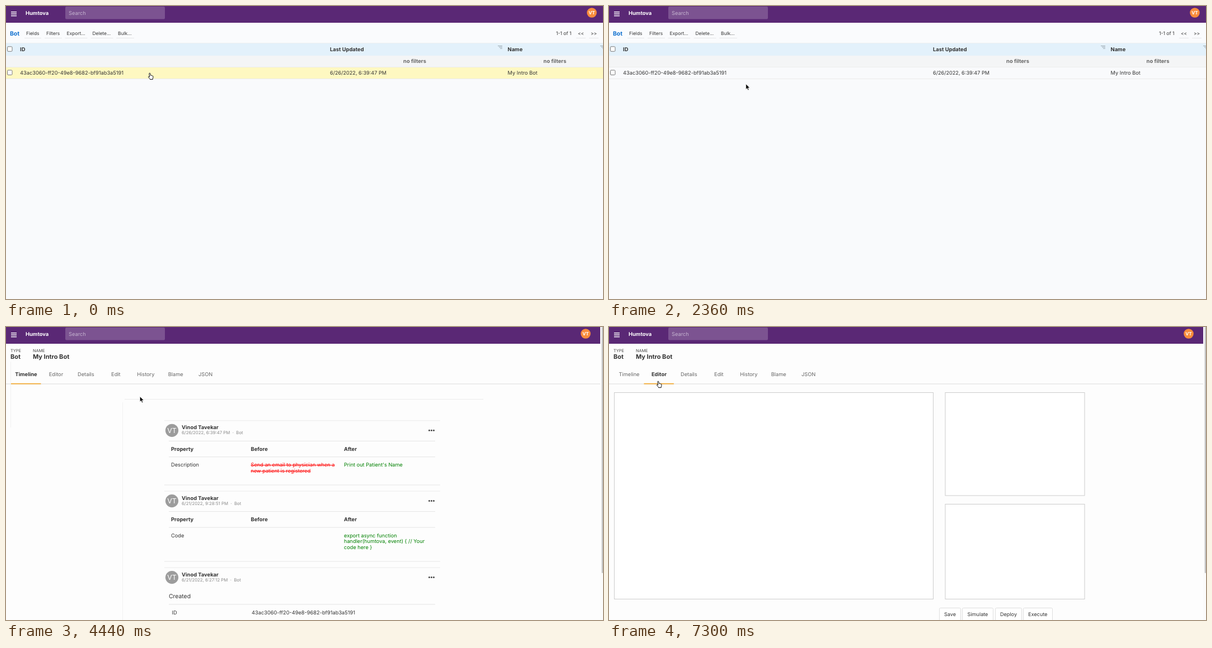
Write an HTML page that moves like this. It is 1067 px wide and 525 px high and loops after 8000 ms.

```html
<!DOCTYPE html>
<html lang="en">
<head>
<meta charset="utf-8">
<title>Bot admin walkthrough</title>
<style>
  html, body { margin: 0; width: 100%; height: 100%; overflow: hidden; background: #f9fafc; }
  svg { display: block; width: 1067px; height: 525px; }
  text { font-family: Inter, "Liberation Sans", sans-serif; text-rendering: geometricPrecision; white-space: pre; }
</style>
</head>
<body>
<svg id="stage" viewBox="0 0 1067 525"></svg>
<script>
const LOOP = 8000;
const LOADING = 3820, LOADED = 4290, NAMED = 4440, EDITOR = 7190;
const BRAND = 'Humtova', PERSON = 'Vinod Tavekar', INITIALS = 'VT', BOT = 'My Intro Bot';
const ID = '43ac3060-ff20-49e8-9682-bf91ab3a5191';

// Markup helpers
const rect = (x, y, w, h, fill, extra = '') =>
  `<rect x="${x}" y="${y}" width="${w}" height="${h}" fill="${fill}" ${extra}/>`;
const frame = (x, y, w, h, stroke = '#ccc', extra = '') => rect(x, y, w, h, '#fff', `stroke="${stroke}" ${extra}`);
const hline = (x1, x2, y, color = '#e4e4e4') => rect(x1, y, x2 - x1, 1, color);
const vline = (x, y1, y2, color) => rect(x, y1, 1, y2 - y1, color);
const text = (x, y, s, size = 9.25, fill = '#333', weight = 400, extra = '') =>
  `<text x="${x}" y="${y}" font-size="${size}" fill="${fill}" font-weight="${weight}" ${extra}>${s}</text>`;
const bold = (x, y, s, size = 9.4, fill = '#333', extra = '') => text(x, y, s, size, fill, 700, extra);
const group = (id, ...parts) => `<g id="${id}">${parts.join('')}</g>`;
const MIDDLE = 'text-anchor="middle"';

const header = () => [
  rect(0, 0, 1067, 30, '#5a2875', 'id="bar"'),
  ...[10, 13.4, 16.8].map(y => rect(9, y, 10, 1.5, '#fff')),
  bold(35, 16, BRAND, 9.4, '#fff'),
  rect(106, 1, 178, 22.5, '#7c5391', 'rx="2"'),
  text(112, 16, 'Search', 9.3, '#c5b3cf'),
  group('avatar',
    '<circle cx="0" cy="12" r="8.8" fill="#f98c3c"/>',
    bold(0, 15, INITIALS, 8.2, '#fff', MIDDLE)),
].join('');

const checkbox = y => frame(2.5, y, 8.5, 8.5, '#767676', 'rx="1.5"');
const sortIcon = x => hline(x, x + 8, 71, '#9aa7b0') + hline(x + 2, x + 8, 73.3, '#9aa7b0') + hline(x + 4, x + 8, 75.6, '#9aa7b0');
const toolButton = ([x, label, width]) =>
  text(x, 52, label, 8.4) + hline(x - 3, x + width + 3, 57, '#e6e7e9');

const listPage = () => group('list',
  rect(0, 30, 1067, 37, '#fafbfd'),
  bold(7, 53, 'Bot', 10.4, '#0f70cf'),
  ...[[36, 'Fields', 24], [72, 'Filters', 25], [108.5, 'Export...', 34], [154.5, 'Delete...', 34], [200, 'Bulk...', 26],
    [1022, '&lt;&lt;', 11], [1045, '&gt;&gt;', 11]].map(toolButton),
  text(983, 52, '1-1 of 1', 8.6),
  rect(0, 67, 1067, 22, '#e3f1fb'),
  hline(0, 1067, 66, '#eceff2'),
  rect(0, 89, 1067, 20, '#f4f5f6'),
  bold(25, 81.3, 'ID'), bold(579, 81.3, 'Last Updated'), bold(896.5, 81.3, 'Name'),
  sortIcon(879), sortIcon(1062),
  bold(730.5, 102.4, 'no filters', 9.4, '#666', MIDDLE),
  bold(981, 102.4, 'no filters', 9.4, '#666', MIDDLE),
  group('columns', ...[18, 572, 889].map(x => vline(x, 67, 89, '#d3e0e9') + vline(x, 89, 109, '#e3e4e6'))),
  rect(0, 109.5, 1067, 20.5, '#fef8c1', 'id="row"'),
  hline(0, 1067, 109, '#eceded'), hline(0, 1067, 130, '#ebebea'),
  checkbox(72.8), checkbox(115),
  text(25, 123.4, ID), text(579, 123.4, '6/26/2022, 6:39:47 PM', 9.15), text(896.5, 123.4, BOT));

const TABS = ['Timeline', 'Editor', 'Details', 'Edit', 'History', 'Blame', 'JSON'];
const tabBar = active => [
  text(8, 45, 'TYPE', 7.3, '#444'), text(48, 45, 'NAME', 7.3, '#444'),
  bold(8, 57, 'Bot', 11), bold(48, 57, BOT, 11),
  hline(0, 1063, 101.5, '#dcdcdc'),
  ...TABS.map((tab, i) => {
    const x = 36 + i * 53.45;
    return i === active
      ? bold(x, 88.4, tab, 9.4, '#333', MIDDLE) + rect(x - 27, 100.8, 53.4, 1.7, '#f3a92f')
      : text(x, 88.4, tab, 9.25, '#666', 400, MIDDLE);
  }),
].join('');

const event = (y, date) => [
  hline(283, 776, y - 18, '#ececec'),
  `<circle cx="296.5" cy="${y}" r="11.6" fill="#9c9c9c"/>`,
  `<g class="named">${text(296.5, y + 4.5, INITIALS, 12.4, '#fff', 400, MIDDLE)}${bold(314, y - 2, PERSON)}</g>`,
  `<g class="date">${text(314, y + 7, `${date}  ·  Bot`, 7.8, '#8a8a8a')}</g>`,
  ...[756.5, 760.5, 764.5].map(x => `<circle cx="${x}" cy="${y}" r="1.5" fill="#444"/>`),
].join('');

const lines = (x, y, rows, fill, extra) =>
  rows.map((row, i) => text(x, y + i * 10.7, row, 9.2, fill, 400, extra)).join('');

const change = (y, date, property, before, after, bottom) => [
  event(y, date),
  hline(291, 767, y + 18.5),
  bold(295, y + 36.5, 'Property'), bold(437.5, y + 36.5, 'Before'), bold(604, y + 36.5, 'After'),
  hline(291, 767, y + 47),
  text(295, y + 65, property),
  lines(437.5, y + 65, before, '#f00', 'text-decoration="line-through"'),
  lines(604, y + 65, after, '#008000'),
  hline(283, 776, bottom, '#e6e6e6'),
].join('');

const timelinePage = () => group('timeline',
  rect(0, 30, 1067, 495, '#fdfdfd'),
  rect(0, 103, 206, 422, '#f9fafb', 'id="margin"'),
  vline(208, 135, 525, '#f1f1f1'), vline(8, 62, 180, '#f1f1f1'),
  hline(212, 853, 129, '#ebebeb'),
  tabBar(0),
  rect(62.7, 100.9, 53.4, 1.5, '#b4d6f5', 'id="tabHover"'),
  change(185.3, '6/26/2022, 6:39:47 PM', 'Description',
    ['Send an email to physician when a', 'new patient is registered'], ["Print out Patient's Name"], 282.5),
  change(311.6, '6/21/2022, 9:28:51 PM', 'Code', [],
    ['export async function', `handler(${BRAND.toLowerCase()}, event) { // Your`, 'code here }'], 419.5),
  event(448.6, '6/21/2022, 6:27:12 PM'),
  text(291, 486, 'Created', 10.4),
  hline(291, 767, 496.5),
  text(296.5, 514.5, 'ID'), text(439, 514.5, ID));

const button = ([x, w, label]) =>
  frame(x + .5, 503.5, w, 30, '#dedede', 'rx="2"') + text(x + w / 2 + .5, 518.3, label, 9.1, '#333', 400, MIDDLE);

const editorPage = () => group('editor',
  rect(0, 30, 1067, 495, '#fdfdfd'),
  tabBar(1),
  frame(9.5, 117.5, 570, 370), frame(601, 117.5, 249, 184.5), frame(601, 317.5, 249, 170),
  ...[[590, 38, 'Save'], [631, 55, 'Simulate'], [690, 47, 'Deploy'], [740, 52, 'Execute']].map(button));

const cursors = () => group('cursor',
  `<path id="arrow" d="M0 0V9.6L2.2 7.6L3.8 11.2L5.4 10.5L3.9 7H7Z" fill="#000" stroke="#fff" stroke-width=".7"/>`,
  `<path id="hand" d="M-.7 1.2Q-.7 .2 .3 .2T1.3 1.2L2 4.4Q3 3.8 3.5 4.7Q4.6 4.1 5 5.2Q6.3 4.8 6.4 6.2Q6.7 8.4 5.7 10V11.6H.9V10.7Q-.8 9.2 -2 7.3Q-2.2 6.1 -1 6.2L.2 7.1Z" fill="#fff" stroke="#111" stroke-width="1" stroke-linejoin="round"/>`);

const RADIUS = 30.6, UNIT = 66.7 / 44;
const stage = document.getElementById('stage');
stage.innerHTML = [
  rect(0, 0, 1067, 525, '#f9fafc'),
  listPage(),
  `<circle id="spinner" cx="533.5" cy="262.5" r="${RADIUS}" fill="none" stroke="#5a2875" stroke-width="3"/>`,
  timelinePage(), editorPage(),
  rect(1062, 0, 5, 525, '#fbfbfb', 'class="scroll"'),
  header(),
  rect(1064.7, 0, 2.3, 441, '#c2c2c2', 'class="scroll" rx="1"'),
  cursors(),
].join('');

const $ = id => document.getElementById(id);
const show = (el, on) => { el.style.display = on ? '' : 'none'; };
const showAll = (name, on) => stage.querySelectorAll('.' + name).forEach(el => show(el, on));
const easeInOut = p => p * p * (3 - 2 * p);
const easeOut = p => 1 - (1 - p) ** 2;

// Each move: start, end, destination of the pointer tip
const START = [256.5, 120];
const MOVES = [
  [185, 380, 308, 205.3],
  [1455, 1600, 299.5, 202],
  [1760, 2580, 240.5, 135],
  [2600, 2860, 239.3, 124.5],
  [5115, 5900, 87.5, 97],
];

function pointerAt(t) {
  let [x, y] = START;
  for (const [from, to, endX, endY] of MOVES) {
    if (t < from) break;
    const p = easeOut(Math.min(1, (t - from) / (to - from)));
    x += (endX - x) * p;
    y += (endY - y) * p;
  }
  return [x, y];
}

function spin(t) {
  const age = t - LOADING + 25;
  const p = easeInOut(Math.min(1, age / 700));
  const dash = (1 + 99 * p) * UNIT;
  $('spinner').setAttribute('stroke-dasharray', `${dash} 400`);
  $('spinner').setAttribute('stroke-dashoffset', -15 * p * UNIT);
  $('spinner').setAttribute('transform', `rotate(${age / 1400 * 360} 533.5 262.5)`);
}

function draw(t) {
  const [x, y] = pointerAt(t);
  const onList = t < LOADING, loaded = t >= LOADED;
  const onRow = onList && y < 130;
  const onTab = loaded && y < 102;

  show($('list'), onList);
  show($('row'), onRow);
  show($('columns'), t >= 2610);
  show($('spinner'), !onList && !loaded);
  spin(Math.max(t, LOADING));

  show($('timeline'), loaded && t < EDITOR);
  show($('margin'), t >= 5300);
  show($('tabHover'), onTab);
  showAll('named', t >= NAMED);
  stage.querySelectorAll('.date').forEach(el =>
    el.setAttribute('transform', `translate(0 ${t < NAMED ? -5 : 0})`));
  show($('editor'), t >= EDITOR);

  showAll('scroll', loaded);
  $('bar').setAttribute('width', loaded ? 1062 : 1067);
  $('avatar').setAttribute('transform', `translate(${loaded ? 1036 : 1047} 0)`);

  $('cursor').setAttribute('transform', `translate(${x} ${y})`);
  show($('hand'), onRow || onTab);
  show($('arrow'), !onRow && !onTab);
}

const begin = performance.now();
function tick() {
  draw((performance.now() - begin) % LOOP);
  requestAnimationFrame(tick);
}
tick();
</script>
</body>
</html>
```
